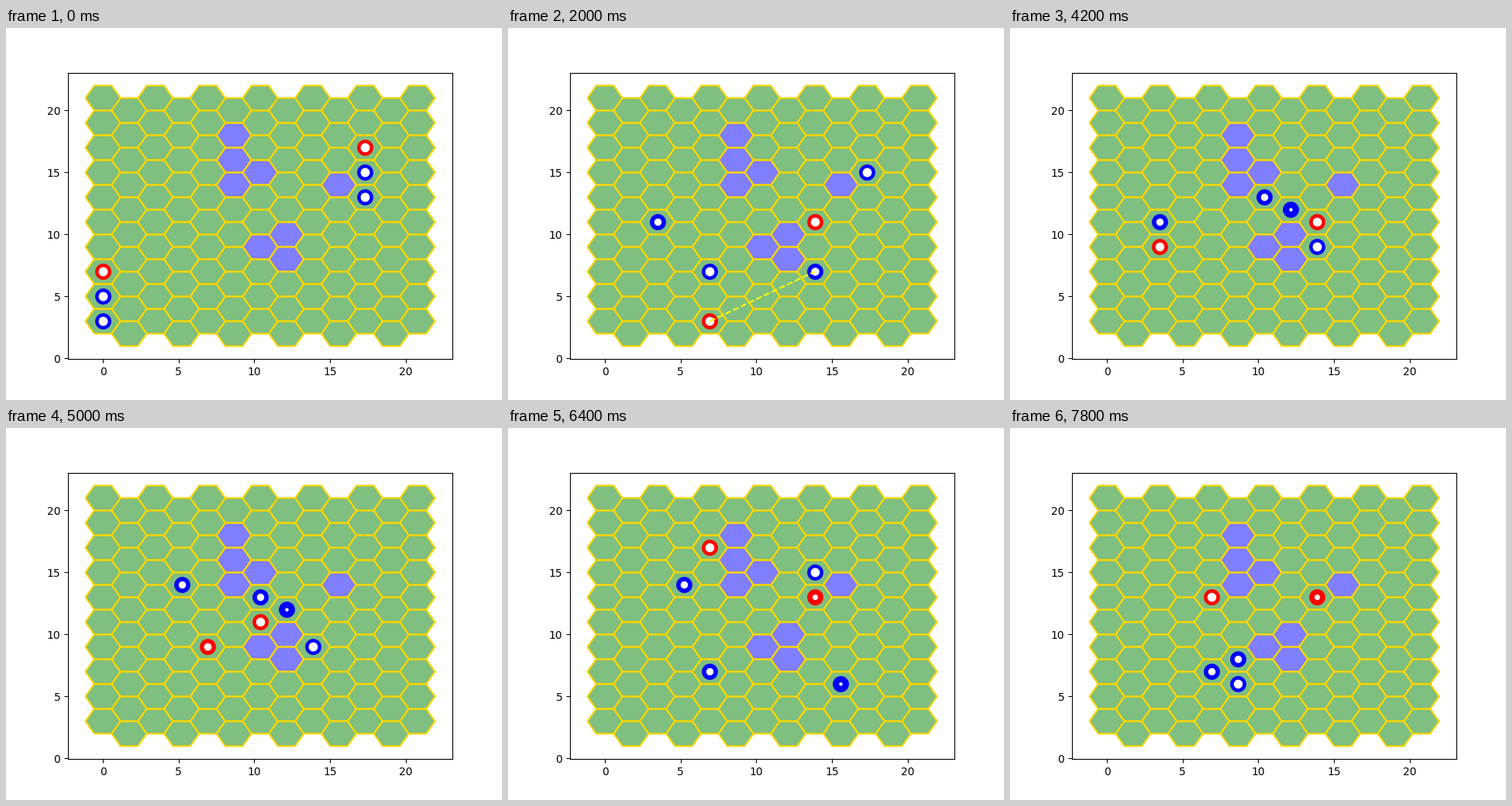
Animation, 640 px wide and 480 px high, one loop 8000 ms. Source, as a matplotlib script:

```python
import math

import matplotlib.pyplot as plt
from matplotlib.animation import FuncAnimation

STEP_MS = 200
FRAMES = 40
COLS, ROWS = 13, 10
COL_W = math.sqrt(3)
FULL = 8.5
LAKES = {(5, 18), (5, 16), (5, 14), (6, 15), (9, 14), (7, 10), (7, 8), (6, 9)}

# name: (color, column, y)
UNITS = {
    "A": ("blue", 0, 3), "B": ("blue", 0, 5),
    "C": ("blue", 10, 13), "D": ("blue", 10, 15),
    "R": ("red", 0, 7), "S": ("red", 10, 17),
}

# One action per step: (unit, column, y) moves, (unit, "target", loss) fires.
ACTIONS = [
    ("B", 2, 11), ("R", "B", 1.7), ("A", 4, 7), ("R", 4, 3), ("C", 8, 7),
    ("S", 8, 11), ("C", "S", 0.2), ("A", "R", 0.2), ("S", "C", 0.4), ("R", "C", 0.6),
    ("C", 6, 7), ("S", "C", 2), ("R", 3, 6), ("S", "C", 2.3), ("R", 2, 9),
    ("A", "R", 0.1), None,
    ("A", 6, 13), ("S", "A", 1.7), ("C", 7, 12), ("D", 8, 9), ("B", 3, 14),
    ("B", "R", 1.2), ("R", 4, 9), ("S", 6, 11),
    ("A", "R", 1.9), ("R", 8, 5), ("S", 4, 17),
    ("D", 8, 15), ("A", 4, 7), ("C", 9, 6), ("R", 8, 13), ("S", 6, 11),
    ("R", "D", 0.2), ("S", "C", 9),
    ("S", 4, 13), ("B", 5, 8), ("D", 7, 12), ("D", 5, 6),
]


def hexagon(col, y):
    r = 2 / math.sqrt(3)
    angles = [math.pi / 3 * k for k in range(7)]
    return ([col * COL_W + r * math.cos(a) for a in angles],
            [y + r * math.sin(a) for a in angles])


def state_at(step):
    """Positions, strengths and the current shot after the given step."""
    pos = {n: (col, y) for n, (_, col, y) in UNITS.items()}
    power = dict.fromkeys(UNITS, FULL)
    shot = None
    for action in ACTIONS[:step]:
        shot = None
        if action is None:
            continue
        name, what, value = action
        if isinstance(what, str):
            power[what] -= value
            shot = (pos[name], pos[what])
        else:
            pos[name] = (what, value)
    return pos, power, shot


fig, ax = plt.subplots(figsize=(6.4, 4.8), dpi=100)
for col in range(COLS):
    for row in range(ROWS):
        y = 2 * row + (2 if col % 2 else 3)
        xs, ys = hexagon(col, y)
        color = "blue" if (col, y) in LAKES else "green"
        ax.fill(xs, ys, color=color, alpha=0.5)
        ax.plot(xs, ys, color="gold", lw=1.5)
ax.set_xlim(ax.get_xlim())
ax.set_ylim(ax.get_ylim())

discs, cores = {}, {}
for name, (color, _, _) in UNITS.items():
    discs[name], = ax.plot([], [], "o", color=color, ms=15, mew=0, zorder=3)
    cores[name], = ax.plot([], [], "o", color="white", mew=0, zorder=4)
beam, = ax.plot([], [], "--", color="yellow", lw=1.5, zorder=5)


def draw(step):
    pos, power, shot = state_at(step)
    for name, (col, y) in pos.items():
        alive = power[name] > 0
        for mark in (discs[name], cores[name]):
            mark.set_data([col * COL_W], [y])
            mark.set_visible(alive)
        cores[name].set_markersize(max(power[name], 0))
    if shot:
        beam.set_data([c * COL_W for c, _ in shot], [y for _, y in shot])
    else:
        beam.set_data([], [])
    return [*discs.values(), *cores.values(), beam]


anim = FuncAnimation(fig, draw, frames=FRAMES, interval=STEP_MS,
                     init_func=lambda: draw(0), repeat=True, repeat_delay=0)
plt.show()
```
